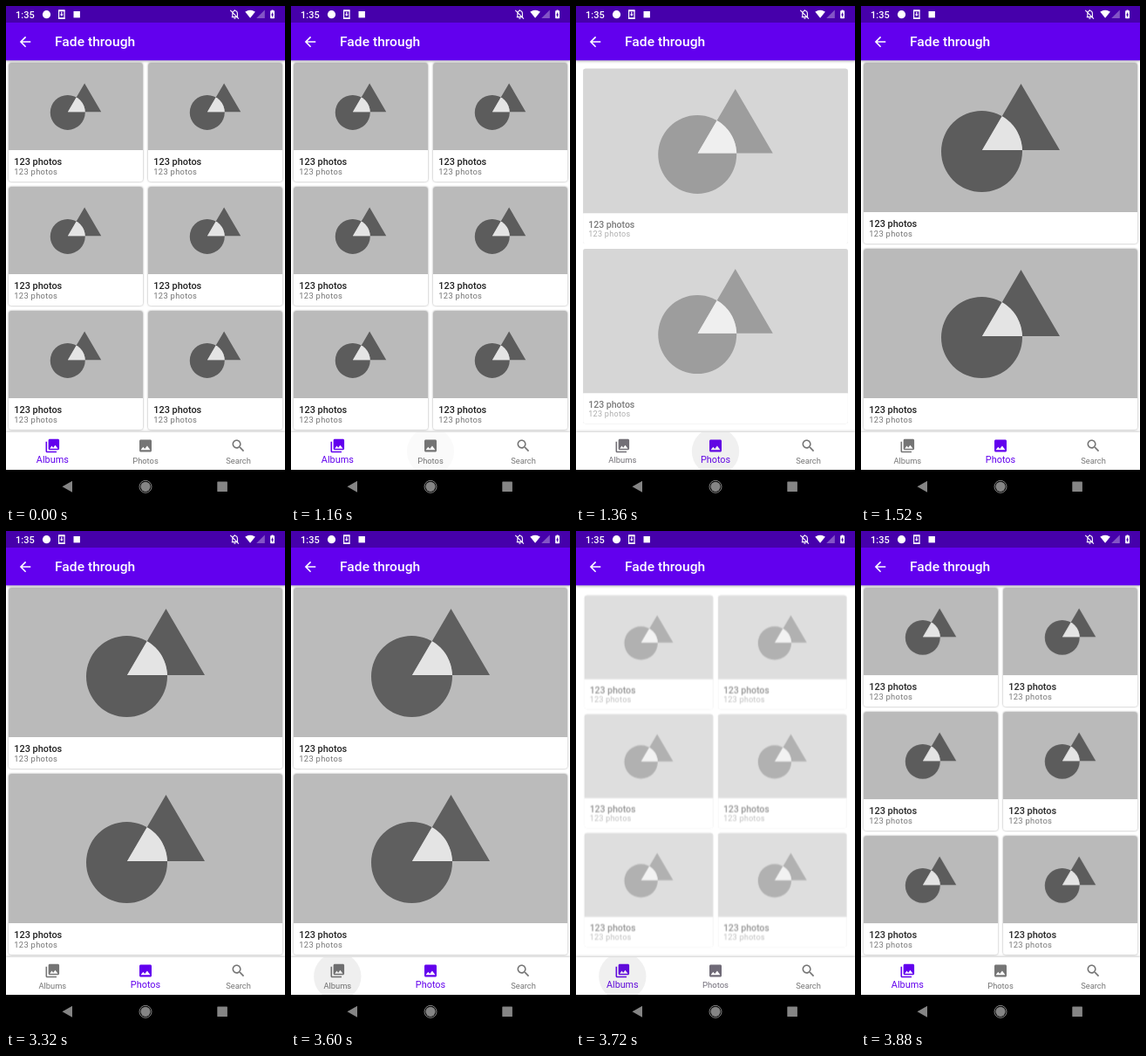
An HTML page that plays this animation: 320x569 px, repeating every 3920 ms.

```html
<!DOCTYPE html>
<html lang="en">
<head>
<meta charset="utf-8">
<title>Fade through</title>
<style>
  html, body { margin: 0; width: 100%; height: 100%; overflow: hidden; background: #fff; }
  svg.stage { display: block; width: 100%; height: 100%; font-family: Roboto, sans-serif; }
  .card { fill: #fff; filter: drop-shadow(0 .7px .8px rgba(0, 0, 0, .36)); }
  .title { font-size: 10.9px; font-weight: 500; fill: #202020; }
  .caption { font-size: 9.33px; letter-spacing: .31px; fill: #757575; }
  .label { font-size: 9.33px; text-anchor: middle; }
  .page { transform-origin: 160px 275px; }
  .appbar { fill: #6200ee; filter: drop-shadow(0 1px 1.5px rgba(0, 0, 0, .3)); }
  .navbar { fill: #fff; filter: drop-shadow(0 -.5px 1.5px rgba(0, 0, 0, .2)); }
</style>
</head>
<body>
<svg class="stage" viewBox="0 0 320 569">
  <defs>
    <clipPath id="disc"><circle cx="-21.5" cy="16" r="46.5"/></clipPath>
    <clipPath id="bar"><path d="M0 488h320v43H0z"/></clipPath>
    <g id="shapes">
      <path fill="#5c5c5c" fill-rule="evenodd"
        d="M-68 16a46.5 46.5 0 1 0 93 0a46.5 46.5 0 1 0 -93 0zM23.5 -61.5L68 14.5H-21z"/>
      <path fill="#e4e4e4" clip-path="url(#disc)" d="M23.5 -61.5L68 14.5H-21z"/>
    </g>
  </defs>

  <path fill="#fff" d="M0 0h320v569H0z"/>
  <g id="albums" class="page"></g>
  <g id="photos" class="page"></g>

  <path class="appbar" d="M0 0h320v62.2H0z"/>
  <path fill="#4600ab" d="M0 0h320v19H0z"/>
  <g fill="#fff">
    <text x="11" y="13.9" font-size="11" font-weight="500">1:35</text>
    <circle cx="46.5" cy="9.7" r="4.6"/>
    <path fill="none" stroke="#fff" stroke-width="1.2" d="M60.6 5.2h6.4v9.2h-6.4zM63.8 6.8v4"/>
    <path d="M61.8 9.4h4l-2 2.4zM60.2 4.6h7.2v1.6h-7.2zM60.2 13.2h7.2v1.6h-7.2z"/>
    <path d="M77.5 6h7.4v7.4h-7.4z"/>
    <path fill="none" stroke="#fff" stroke-width="1.1"
      d="M258.8 12.6h6.6V9c0-4.6-5.6-4.6-5.6 0v3.6M262.4 5.6V4.3M257.3 4.8l9.6 9.8M261.4 14.2h2"/>
    <path transform="translate(274.2 3.3) scale(.49)"
      d="M12.01 21.49L23.64 7C23.19 6.66 18.71 3 12 3S.81 6.66.36 7l11.65 14.49z"/>
    <path fill-opacity=".33" d="M287.2 14h9.6V4.6z"/>
    <path transform="translate(299.7 3.4) scale(.49)" fill-rule="evenodd"
      d="M15.67 4H14V2h-4v2H8.33C7.6 4 7 4.6 7 5.33v15.33C7 21.4 7.6 22 8.33 22h7.33c.74 0 1.34-.6 1.34-1.33V5.33C17 4.6 16.4 4 15.67 4zM11 20v-5.5H9L13 7v5.5h2L11 20z"/>
    <path transform="translate(12.7 31.7) scale(.778)"
      d="M20 11H7.83l5.59-5.59L12 4l-8 8 8 8 1.41-1.41L7.83 13H20v-2z"/>
    <text x="56" y="46.4" font-size="15.56" font-weight="500" letter-spacing=".05">Fade through</text>
  </g>

  <path class="navbar" d="M0 488h320v43H0z"/>
  <g clip-path="url(#bar)"><circle id="ripple" cy="510" r="27.2"/></g>
  <g id="tabs"></g>

  <path d="M0 531h320v38H0z"/>
  <g fill="#858585">
    <path d="M64.5 550.3L76 543.8v13z"/>
    <circle cx="160" cy="550.3" r="5.6"/>
    <circle cx="160" cy="550.3" r="7" fill="none" stroke="#858585" stroke-width="1"/>
    <rect x="242.3" y="544.5" width="11.6" height="11.6" rx=".6"/>
  </g>
</svg>
<script>
const LOOP = 3920, STEP = 40;
const TO_PHOTOS = 1215, TO_ALBUMS = 3591;
const $ = id => document.getElementById(id);
const clamp = v => Math.min(1, Math.max(0, v));

function bezier(x1, y1, x2, y2) {
  const at = (a, b, s) => 3 * a * s * (1 - s) ** 2 + 3 * b * s * s * (1 - s) + s ** 3;
  return x => {
    if (x <= 0 || x >= 1) return clamp(x);
    let lo = 0, hi = 1;
    for (let i = 0; i < 24; i++) {
      const mid = (lo + hi) / 2;
      if (at(x1, x2, mid) < x) lo = mid; else hi = mid;
    }
    return at(y1, y2, lo);
  };
}
const accelerate = bezier(.4, 0, 1, 1);
const decelerate = bezier(0, 0, .2, 1);
const standard = bezier(.4, 0, .2, 1);

function card(x, y, w, imageH, scale) {
  return `<rect class="card" x="${x}" y="${y}" width="${w}" height="${imageH + 36}" rx="3"/>
    <path fill="#bababa" d="M${x} ${y + imageH}v${3 - imageH}q0 -3 3 -3h${w - 6}q3 0 3 3v${imageH - 3}z"/>
    <use href="#shapes" transform="translate(${x + w / 2} ${y + imageH / 2}) scale(${scale})"/>
    <text class="title" x="${x + 6.3}" y="${y + imageH + 17}">123 photos</text>
    <text class="caption" x="${x + 6.3}" y="${y + imageH + 27.8}">123 photos</text>`;
}
for (const y of [65, 207, 349])
  for (const x of [3, 163]) $('albums').innerHTML += card(x, y, 154, 100, .43);
for (const y of [65, 278]) $('photos').innerHTML += card(3, y, 314, 171, 1);

const tabs = [
  ['Albums', 53.3, 'M22 16V4c0-1.1-.9-2-2-2H8c-1.1 0-2 .9-2 2v12c0 1.1.9 2 2 2h12c1.1 0 2-.9 2-2zm-11-4l2.03 2.71L16 11l4 5H8l3-4zM2 6v14c0 1.1.9 2 2 2h14v-2H4V6H2z'],
  ['Photos', 160, 'M21 19V5c0-1.1-.9-2-2-2H5c-1.1 0-2 .9-2 2v14c0 1.1.9 2 2 2h14c1.1 0 2-.9 2-2zM8.5 13.5l2.5 3.01L14.5 12l4.5 6H5l3.5-4.5z'],
  ['Search', 266.5, 'M15.5 14h-.79l-.28-.27C15.41 12.59 16 11.11 16 9.5 16 5.91 13.09 3 9.5 3S3 5.91 3 9.5 5.91 16 9.5 16c1.61 0 3.09-.59 4.23-1.57l.27.28v.79l5 4.99L20.49 19l-4.99-5zm-6 0C7.01 14 5 11.99 5 9.5S7.01 5 9.5 5 14 7.01 14 9.5 11.99 14 9.5 14z']
];
$('tabs').innerHTML = tabs.map(([name, x, icon]) =>
  `<g><path transform="translate(${x - 9.33} 494.2) scale(.778)" d="${icon}"/>
   <text class="label" y="-2.3">${name}</text></g>`).join('');

function setTab(i, selected) {
  const tab = $('tabs').children[i];
  const rgb = [98, 0, 238].map(c => c * selected);
  tab.setAttribute('fill', `rgba(${rgb}, ${.54 + .46 * selected})`);
  tab.lastElementChild.setAttribute('transform',
    `translate(${tabs[i][1]} 525.8) scale(${1 + selected / 6})`);
}

function setPage(page, opacity, scale) {
  page.style.opacity = opacity;
  page.style.transform = scale === 1 ? 'none' : `scale(${scale})`;
}

function render(t) {
  const back = t >= 3480;
  const start = back ? TO_ALBUMS : TO_PHOTOS;
  const pages = [$('albums'), $('photos')];
  const from = back ? 1 : 0, to = 1 - from;

  // Old page leaves in the first 30%, then the new one fades and grows in.
  const p = clamp((t - start) / 300);
  const enter = decelerate((p - .3) / .7);
  setPage(pages[from], 1 - accelerate(p / .3), 1);
  setPage(pages[to], enter, .92 + .08 * enter);

  const selected = standard((t - start) / 200);
  setTab(from, 1 - selected);
  setTab(to, selected);
  setTab(2, 0);

  const press = t - (back ? 3480 : 1120);
  const tint = Math.min(clamp(press / 160), clamp((380 - press) / 200));
  $('ripple').setAttribute('cx', tabs[to][1]);
  $('ripple').setAttribute('fill-opacity', .083 * tint);
}

const begin = performance.now();
function frame() {
  const t = (performance.now() - begin) % LOOP;
  render(Math.floor(t / STEP) * STEP);
  requestAnimationFrame(frame);
}
frame();
</script>
</body>
</html>
```
